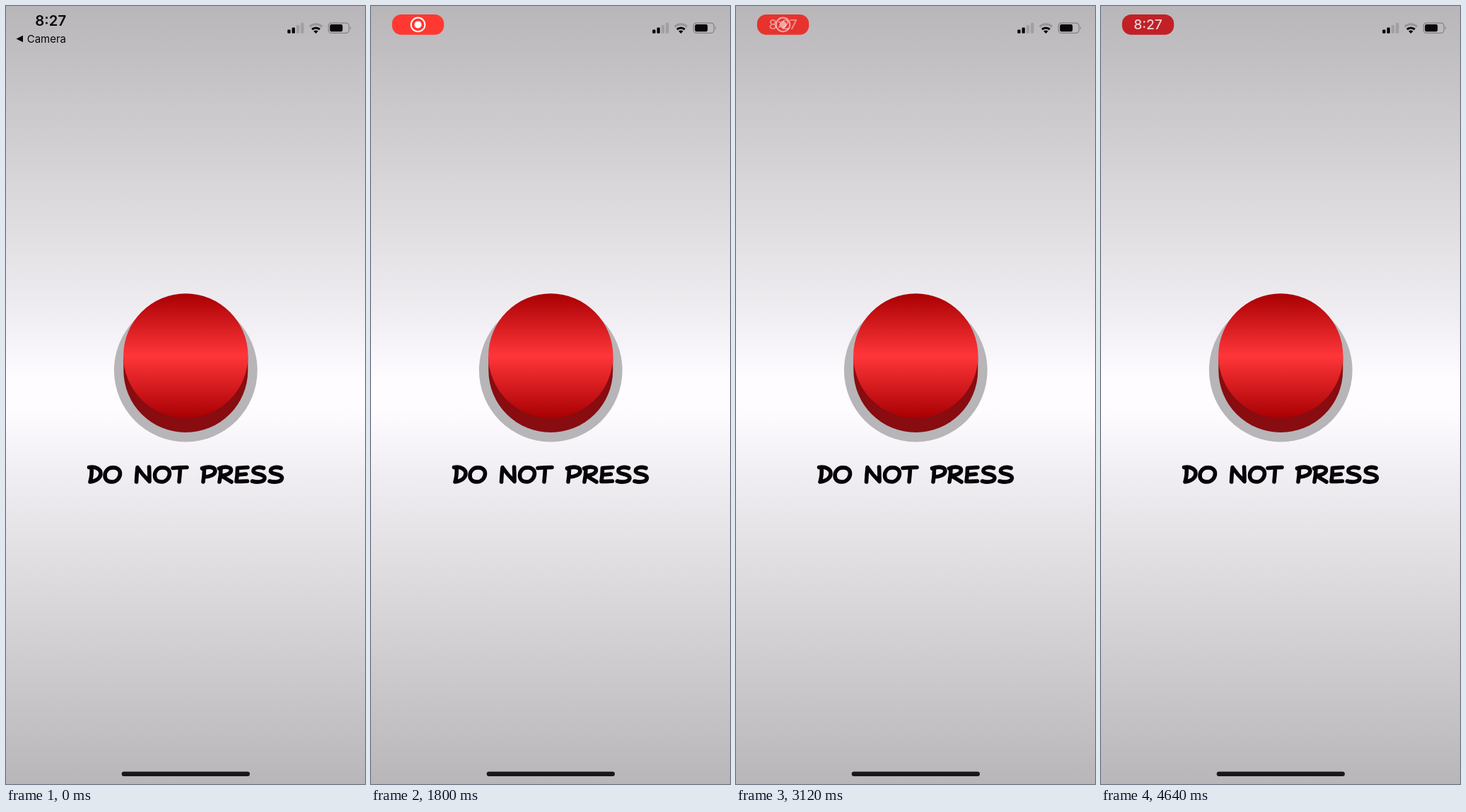
An HTML page that plays this animation: 508x1102 px, repeating every 4.68 s.

```html
<!DOCTYPE html>
<html lang="en">
<head>
<meta charset="utf-8">
<title>Do not press</title>
<style>
  html, body { margin: 0; width: 100%; height: 100%; overflow: hidden; }
  body { background: #b9b7ba; }
  svg { display: block; width: 100vw; height: 100vh; }
  text { font-family: Inter, Roboto, sans-serif; }
  .lettering { fill: none; stroke: #050308; stroke-width: 5.6; stroke-linecap: round; stroke-linejoin: round; }
</style>
</head>
<body>
<svg viewBox="0 0 508 1102">
  <defs>
    <linearGradient id="steel" x2="0" y2="1">
      <stop offset="0" stop-color="#b8b6b9"/>
      <stop offset=".3" stop-color="#e3e0e4"/>
      <stop offset=".4" stop-color="#f0eef2"/>
      <stop offset=".48" stop-color="#fefcff"/>
      <stop offset=".52" stop-color="#fefcff"/>
      <stop offset=".6" stop-color="#f0eef2"/>
      <stop offset=".7" stop-color="#e3e0e4"/>
      <stop offset="1" stop-color="#b8b6b9"/>
    </linearGradient>
    <linearGradient id="red" x2="0" y2="1">
      <stop offset="0" stop-color="#a80003"/>
      <stop offset=".5" stop-color="#ff3639"/>
      <stop offset="1" stop-color="#a80003"/>
    </linearGradient>
  </defs>
  <rect width="508" height="1102" fill="url(#steel)"/>

  <!-- Button -->
  <circle cx="254.3" cy="516" r="101.4" fill="#b7b5b8"/>
  <path d="M166.3 495.5v20.5a88 88 0 0 0 176 0v-20.5z" fill="#880c10"/>
  <circle cx="254.3" cy="495.5" r="88.2" fill="url(#red)"/>

  <!-- Hand lettering -->
  <g class="lettering" role="img" aria-label="DO NOT PRESS">
    <path d="M121 654Q122 664 119 674M117.5 653.5C127 652 134 656 134 662C134 669 127 673 119 674"/>
    <path d="M152 654C145 653 140 659 140 665C140 671 144 674 150 674C157 674 161.500 668 161.500 662C161.500 657 157 653 150 654"/>
    <path d="M184.500 674Q185 663 186 653.500Q194 665 203 673.500Q203 662 202.500 653"/>
    <path d="M222 654C215 653 210.500 659 210.500 665C210.500 671 215 674 220 674C227 674 231.500 668 231.500 662C231.500 657 227 653 220 654"/>
    <path d="M236 654.500Q246 653.500 256 653.500M246.500 655Q246 665 245 674"/>
    <path d="M280.500 655Q280.500 665 279 674M277.500 655C287 651.500 296 653 296 658.500C296 664 288 667 281 667"/>
    <path d="M304 655Q304 665 302 674M301.500 655C310 651.500 318.500 653 318.500 657.500C318.500 662 311 664.500 305 665.500Q312 670 319 674"/>
    <path d="M342 653.500Q334 654 327.500 654.500Q327.500 665 326 673.500Q334 673.500 341.500 673M328 664Q334 663.500 339.500 663"/>
    <path d="M364.500 654.500C357 652 350 654 350 658.500C350 664 366 662 366 668.500C366 674.500 355 675 348.500 673"/>
    <path d="M389 654.500C381.500 652 374.500 654 374.500 658.500C374.500 664 390.500 662 390.500 668.500C390.500 674.500 379.500 675 373 673"/>
  </g>

  <!-- Left status area -->
  <g id="idle" fill="#08070a">
    <text x="41.300" y="28.300" font-size="20.300" font-weight="600">8:27</text>
    <path d="M14.500 46.500L24 41.700V51.300Z"/>
    <text x="29.700" y="52" font-size="15">Camera</text>
  </g>
  <g id="pill">
    <rect id="plate" x="29.800" y="12" width="73.400" height="28.800" rx="13"/>
    <g id="icon">
      <circle cx="66.500" cy="26.400" r="9.800" fill="none" stroke="#fff" stroke-width="2"/>
      <circle cx="66.500" cy="26.400" r="5" fill="#fff"/>
    </g>
    <text id="clock" x="66.500" y="33.300" font-size="19.200" font-weight="500" text-anchor="middle">8:27</text>
  </g>

  <!-- Right status area -->
  <g fill="#08070a">
    <rect x="398.300" y="33.500" width="4.300" height="5.300" rx="1.200"/>
    <rect x="404.600" y="30.500" width="4.300" height="8.300" rx="1.200"/>
    <g fill="#a19fa2">
      <rect x="410.900" y="27" width="4.300" height="11.800" rx="1.200"/>
      <rect x="417.100" y="23.800" width="4.300" height="15" rx="1.200"/>
    </g>
    <path d="M438.500 39l-3.200-3.200a4.600 4.600 0 0 1 6.400 0z"/>
    <path d="M433 33.200a8 8 0 0 1 11 0" fill="none" stroke="#08070a" stroke-width="3"/>
    <path d="M429.800 29.300a12.700 12.700 0 0 1 17.400 0" fill="none" stroke="#979598" stroke-width="3"/>
    <rect x="456.300" y="24.100" width="29" height="14.200" rx="4" fill="none" stroke="#828083" stroke-width="1.200"/>
    <rect x="458.300" y="26.100" width="18" height="10.200" rx="2.300"/>
    <path d="M487 28.800q2.400 2.400 0 4.800z" fill="#828083"/>
  </g>

  <rect x="163.700" y="1084.500" width="181.300" height="6.600" rx="3.300" fill="#19171b"/>
</svg>
<script>
  const LOOP = 4680, PULSE = 1880;
  const $ = id => document.getElementById(id);
  const ramp = (t, from, to) => {
    const u = Math.min(1, Math.max(0, (t - from) / (to - from)));
    return u * u * (3 - 2 * u);
  };
  const mix = (a, b, u) => `rgb(${a.map((v, i) => Math.round(v + (b[i] - v) * u))})`;
  const start = performance.now();

  function draw(now) {
    const t = Math.max(0, now - start) % LOOP;
    const shown = ramp(t, 40, 400);
    const clock = ramp(t, 3000, 3260);
    const tap = ramp(t, 4480, 4640);
    const dim = (1 - Math.cos((t - 1820) / PULSE * 2 * Math.PI)) / 2;

    $('idle').style.opacity = 1 - shown;
    $('pill').style.opacity = shown;
    $('icon').style.opacity = 1 - clock;
    $('clock').style.opacity = clock;
    $('clock').style.fill = mix([255, 255, 255], [232, 211, 213], tap);
    const red = [[255, 57, 49], [219, 48, 45]].map(c => c.map((v, i) => v + ([194, 32, 38][i] - v) * tap));
    $('plate').style.fill = mix(red[0], red[1], dim);
    requestAnimationFrame(draw);
  }
  draw(start);
</script>
</body>
</html>
```
